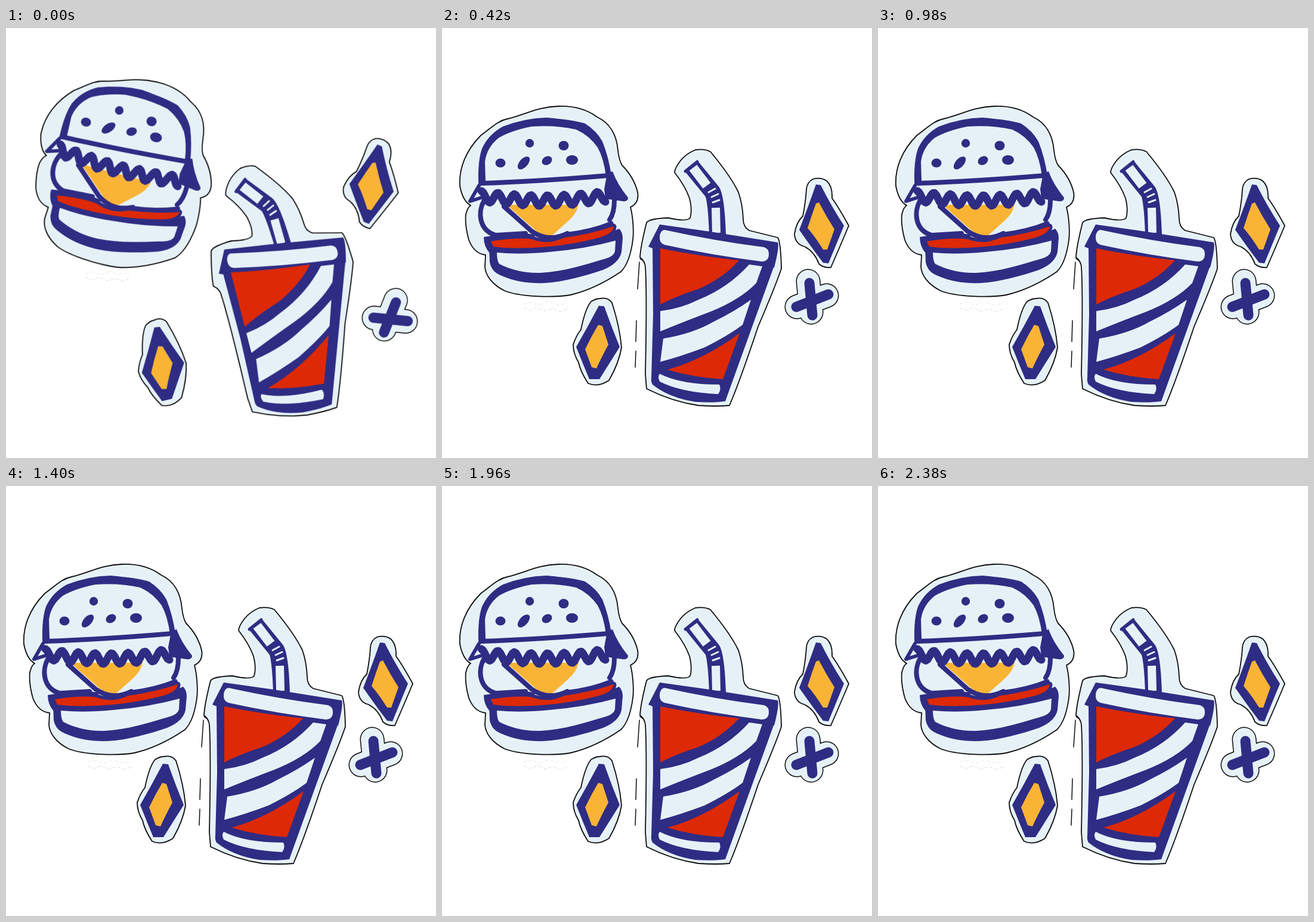
These frames come from a looping animation (721 px wide and 720 px high, 2.52 s). An HTML page:

```html
<!DOCTYPE html>
<html lang="en">
<head>
<meta charset="utf-8">
<title>Burger and drink stickers</title>
<style>
  html, body { margin: 0; width: 100%; height: 100%; overflow: hidden; background: #fff; }
  svg { display: block; width: 100vw; height: 100vh; }
  .paper { fill: #e6f1f7; stroke: #0c0c0c; stroke-width: 1.8; stroke-linejoin: round; }
  .light { fill: #e6f1f7; }
  .navy { fill: #2f2c84; }
  .red { fill: #dd2905; }
  .gold { fill: #fab435; }
  .line, .pale, .edge { fill: none; stroke: #2f2c84; stroke-linecap: round; stroke-linejoin: round; }
  .pale { stroke: #e6f1f7; }
  .edge { stroke: #0c0c0c; }
  .cut { stroke-linecap: butt; }
</style>
</head>
<body>
<svg viewBox="0 0 721 720">
  <g id="specks" fill="none" stroke="#cfcfcf" stroke-width="1">
    <path stroke-dasharray="2 3 1 4" d="M137 462L150 459L163 465L178 458L193 464L212 461"/>
    <path stroke-dasharray="3 2 1 3" d="M138 469L148 473L160 468L172 474L186 470L199 475L213 469"/>
  </g>

  <g id="burger">
    <path class="paper" d="M195 131C225 130 245 138 260 149C283 160 293 180 295 205Q297 222 302 230Q322 250 328 275Q331 293 316 300C320 315 322 340 320 355C316 385 308 400 300 408C275 425 245 440 215 447C185 452 130 450 105 440C85 430 73 415 72 400L73 380Q54 378 45 355Q38 330 40 312Q43 300 48 297Q35 290 30 265C28 235 40 205 65 180C85 165 95 155 110 152C140 145 160 132 195 131Z"/>
    <path class="navy" d="M79 366L80 392Q83 408 98 414C125 426 150 428 172 427C205 425 240 415 270 405Q297 394 301 375L303 352Q303 342 297 336Q240 362 180 366Z"/>
    <path class="light" d="M92 376Q92 390 96 395C115 405 140 411 165 410C205 408 240 396 275 386Q288 382 290 374L291 356Q240 370 180 375Q130 380 92 376Z"/>
    <path class="gold" d="M108 296L229 296Q226 310 213 322L184 348Q176 354 166 347Z"/>
    <path class="line" stroke-width="8" d="M70 290C61 306 60 338 90 347L140 344M104 299L150 340Q178 360 210 344M289 288Q289 310 281 321"/>
    <path class="line" stroke-width="7" d="M206 346Q250 341 284 327"/>
    <path class="navy" d="M70 350L96 346Q140 342 155 346L155 372L80 377Q70 366 70 350Z"/>
    <path class="line" stroke-width="11" d="M82 357Q130 350 152 354Q178 364 205 351Q250 345 287 333Q285 345 260 352Q220 362 180 366Q120 371 86 366Z"/>
    <path class="red" d="M82 357Q130 350 152 354Q178 364 205 351Q250 345 288 332Q287 345 260 352Q220 362 180 366Q120 371 86 366Z"/>
    <path class="line" stroke-width="6" d="M62 264L47 290L66 284"/>
    <path class="navy" d="M277 243L286 240Q294 262 312 284Q312 291 303 290L274 286L272 270Z"/>
    <path class="line" id="frill" stroke-width="13"/>
    <path class="line" stroke-width="8" d="M65 260Q160 257 279 247"/>
    <path class="navy" d="M61 258Q60 222 67 202Q78 178 102 165Q138 151 175 150Q222 154 240 160Q259 172 269 190Q279 215 284 246L275 248Q271 218 261 200Q247 180 225 170Q190 162 150 165Q115 172 95 184Q75 200 72 224L73 256Z"/>
    <g class="navy">
      <circle cx="147" cy="193" r="7.2"/>
      <ellipse cx="204" cy="197" rx="8.5" ry="8"/>
      <ellipse cx="98" cy="226" rx="8.5" ry="7.5"/>
      <ellipse cx="137" cy="226" rx="13" ry="7" transform="rotate(-48 137 226)"/>
      <ellipse cx="176" cy="222" rx="9" ry="7" transform="rotate(-30 176 222)"/>
      <ellipse cx="218" cy="221" rx="10" ry="8"/>
    </g>
  </g>

  <g id="slivers" class="edge" stroke-width="1.5">
    <path d="M331 392L328 437M326 490L325 525M325 541L324 568M332 386L340 392"/>
  </g>

  <g id="cup">
    <path class="paper" d="M425 204Q440 202 450 207C465 225 485 250 497 275Q504 295 505 320Q505 333 515 339L563 351Q568 358 569 403C560 430 545 465 530 500C515 545 500 590 482 632Q460 634 430 632C395 627 365 615 343 604L341 580C342 520 344 450 341 400Q340 390 332 384Q333 365 343 326Q347 319 380 318Q410 325 416 318Q420 305 415 285Q408 265 390 242Q390 235 400 222Q410 210 425 204Z"/>
    <path class="line cut" stroke-width="28" d="M417 230L453 274Q460 284 462 346"/>
    <path class="line" stroke-width="5" d="M408 240L428 224"/>
    <path class="pale cut" stroke-width="16" d="M421 234L444 264"/>
    <path class="pale cut" stroke-width="14" d="M459 301L460 343"/>
    <path class="pale" stroke-width="3" d="M447 275L458 269M452 283L463 278M454 292L465 288"/>
    <path class="navy" d="M353 366L557 398L475 625Q455 628 425 626Q380 619 353 597Q350 592 351 585L354 480Z"/>
    <path class="navy" d="M365 329L450 341L563 359Q566 366 557 401L541 402L360 372L346 366Z"/>
    <path class="light" d="M373 338Q460 357 540 367Q549 370 548 380Q547 391 536 391Q450 380 373 363Q364 360 365 349Q366 339 373 338Z"/>
    <path class="red" d="M366 369Q430 382 498 389Q470 420 430 437Q390 450 366 463Z"/>
    <path class="light" d="M515 396L537 399L527 427Q500 455 450 475Q410 490 366 508L366 474Q400 470 430 455Q480 435 515 396Z"/>
    <path class="light" d="M518 455L504 497Q480 515 440 535Q400 550 366 559L371 520Q420 512 455 492Q490 475 518 455Z"/>
    <path class="red" d="M499 511L471 588Q420 585 378 572Q440 555 499 511Z"/>
    <path class="light" d="M365 579Q400 597 465 597Q469 605 463 613Q400 610 365 592Q361 584 365 579Z"/>
  </g>

  <g id="gemRight">
    <path class="paper" d="M622 253Q635 249 645 256Q655 265 654 285Q665 300 682 331Q672 355 652 401Q640 402 632 395Q625 375 608 366Q592 362 591 345Q594 325 605 315Q610 290 611 270Q612 258 622 253Z"/>
    <path class="navy" d="M627 262L635 263Q652 297 674 331L648 394L639 393Q617 364 599 338Q613 302 627 262Z"/>
    <path class="gold" d="M632 292Q644 315 658 337L646 371L639 371Q626 350 613 335Q620 313 627 294Z"/>
  </g>

  <g id="gemLeft">
    <path class="paper" d="M265 453Q278 450 285 460Q298 500 301 535Q297 560 280 590Q262 602 245 595Q232 575 229 560Q220 545 220 530Q225 515 233 505Q240 470 250 458Q258 453 265 453Z"/>
    <path class="navy" d="M263 465L272 466Q284 500 298 534L264 588L247 588Q236 562 225 534Q244 501 263 465Z"/>
    <path class="gold" d="M262 497L269 499L279 530Q267 552 259 570L251 568L240 538Q250 517 262 497Z"/>
  </g>

  <g id="cross">
    <path class="edge" stroke-width="41" d="M614 424L619 476M595 467L645 448"/>
    <path class="pale" stroke-width="38" d="M614 424L619 476M595 467L645 448"/>
    <path class="line" stroke-width="17" d="M616 427L621 481M594 467L648 446"/>
  </g>
</svg>
<script>
const STEP = 140;
const POSES = [..."ABCBABCBCABCBABCAB"];
const TILT = { A: 1, B: 0, C: 0.5 };
const $ = id => document.getElementById(id);

// id, pivot x, pivot y, shift x, shift y, degrees, extra lift in the middle pose
const PARTS = [
  ["burger", 163.3, 214.2, 37, -51.5, 14.7, -9],
  ["cup", 430, 481.8, 37, 20.9, -14.4, 0],
  ["gemRight", 636.8, 331.3, -22.8, -66.8, 15.2, 0],
  ["gemLeft", 262.5, 530, 0.8, 34.8, -13.4, 0],
  ["cross", 618, 457, 24, 30, 27, 0],
  ["specks", 175, 467, -3, -51, 0, 0]
];

function play(id, style) {
  const last = POSES.length;
  const frames = [...POSES, POSES[last - 1]].map((pose, i) =>
    ({ ...style(pose), offset: i / last, easing: "steps(1, end)" }));
  $(id).animate(frames, { duration: STEP * last, iterations: Infinity });
}

for (const [id, x, y, dx, dy, deg, lift] of PARTS) {
  play(id, pose => {
    const k = TILT[pose];
    const up = pose === "C" ? lift : 0;
    return {
      transform: `translate(${x + dx * k}px, ${y + dy * k + up}px) rotate(${deg * k}deg) translate(${-x}px, ${-y}px)`
    };
  });
}
play("slivers", pose => ({ opacity: pose === "B" ? 1 : 0 }));

// Lettuce edge: a wave that sags in the middle
const wave = [];
for (let i = 0; i <= 72; i++) {
  const u = i / 72;
  const y = 282 + 7 * Math.sin(Math.PI * u) - 9 * Math.cos(Math.PI * 2 * 7.5 * u);
  wave.push(`${(66 + 208 * u).toFixed(1)} ${y.toFixed(1)}`);
}
$("frill").setAttribute("d", "M" + wave.join("L"));
</script>
</body>
</html>
```
